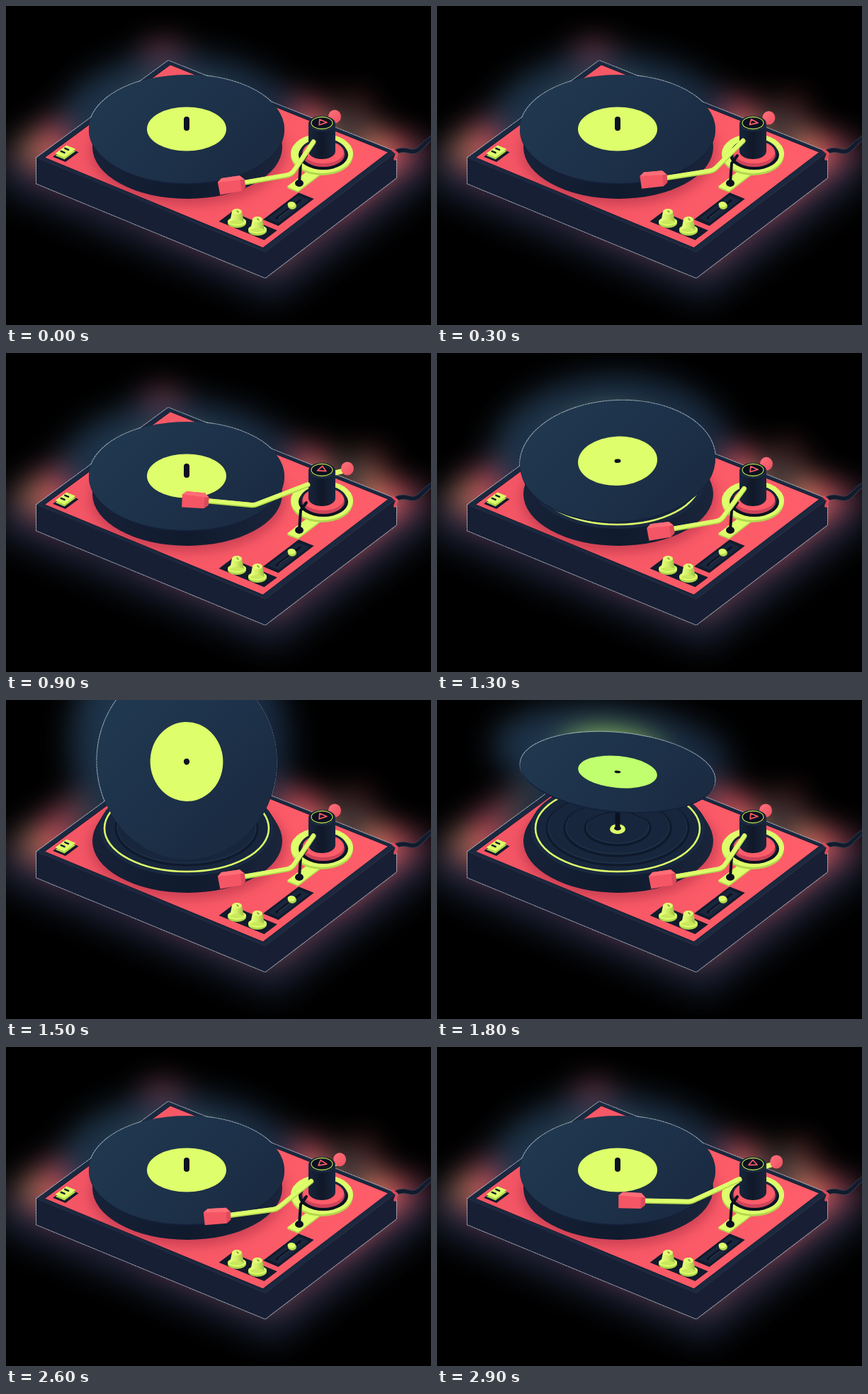
Animation, 600 px wide and 450 px high, one loop 3000 ms. Source, as an HTML page with a canvas:

```html
<!DOCTYPE html>
<html lang="en">
<head>
<meta charset="utf-8">
<title>Turntable</title>
<style>
html, body { margin: 0; width: 100%; height: 100%; overflow: hidden; background: #000; }
canvas { display: block; width: 600px; height: 450px; }
</style>
</head>
<body>
<canvas id="stage" width="600" height="450"></canvas>
<script>
const stage = document.getElementById('stage').getContext('2d');
const layer = document.createElement('canvas');
layer.width = 600;
layer.height = 450;
const g = layer.getContext('2d');

const DARK = '#121b2d', INK = '#0b1120', PINK = '#ff5c69', LIME = '#deff6b', OLIVE = '#b3d64e';
const LOOP = 3000, CYCLE = 2200, STEP = 100;
const TAU = Math.PI * 2;
const CX = 255;

const clamp = x => Math.min(1, Math.max(0, x));
const smooth = x => { x = clamp(x); return x * x * (3 - 2 * x); };
const smoother = x => { x = clamp(x); return x * x * x * (10 - 15 * x + 6 * x * x); };
const mix = (a, b, k) => a + (b - a) * k;

// Point on the lid: u runs along the front left edge, v along the back left edge
const lid = (u, v, down = 0) => [
  43 + 323 * u + 186 * v - u * v,
  214 + 133 * u - 137 * v - 4 * u * v + down
];

function poly(points, fill) {
  g.beginPath();
  points.forEach(([x, y]) => g.lineTo(x, y));
  g.closePath();
  if (fill) { g.fillStyle = fill; g.fill(); }
}

function slab(u0, v0, u1, v1, fill, down = 0) {
  poly([lid(u0, v0, down), lid(u0, v1, down), lid(u1, v1, down), lid(u1, v0, down)], fill);
}

function disc(x, y, rx, ry, fill, turn = 0) {
  g.beginPath();
  g.ellipse(x, y, rx, ry, turn, 0, TAU);
  if (fill) { g.fillStyle = fill; g.fill(); }
}

function outline(color, width) {
  g.strokeStyle = color;
  g.lineWidth = width;
  g.stroke();
}

function ring(x, y, rx, ry, color, width) {
  disc(x, y, rx, ry);
  outline(color, width);
}

function line(points, color, width) {
  g.beginPath();
  points.forEach(([x, y]) => g.lineTo(x, y));
  outline(color, width);
}

function shade(x0, y0, x1, y1, ...colors) {
  const gradient = g.createLinearGradient(x0, y0, x1, y1);
  colors.forEach((c, i) => gradient.addColorStop(i / (colors.length - 1), c));
  return gradient;
}

function speckle() {
  g.setLineDash([2, 2]);
  outline('rgba(195,210,220,.7)', 2);
  g.setLineDash([]);
}

// The record rises, turns over about a tilted axis and drops back
function recordAt(t) {
  const lift = 105 * (smooth((t - 1170) / 450) - smooth((t - 1675) / 335));
  const flip = Math.PI * smoother((t - 1180) / 780);
  const c = Math.cos(flip), s = Math.sin(flip);
  const normal = [-0.45 * s, 0.832 * c - 0.494 * s, 0.555 * c + 0.74 * s];
  const under = normal[2] < 0;
  const [nx, ny, nz] = under ? normal.map(n => -n) : normal;
  return { nx, ny, nz, lift, under, y: 173.5 - lift, turn: Math.atan2(nx, ny) };
}

function armAt(t) {
  const swing = smooth(t / 930) - smooth((t - 930) / 430);
  const move = (x0, y0, x1, y1) => [mix(x0, x1, swing), mix(y0, y1, swing)];
  const head = move(318.5, 252, 267, 207);
  head[1] += 18 * swing * (1 - swing);
  return {
    swing, head,
    angle: mix(-0.14, 0.09, swing),
    elbow: move(403, 237, 350, 214),
    joint: move(434, 191, 426, 185),
    ball: move(464, 156, 482, 163)
  };
}

function drawCable() {
  g.beginPath();
  g.moveTo(550, 206);
  g.bezierCurveTo(566, 198, 572, 211, 583, 202);
  g.bezierCurveTo(590, 196, 594, 190, 604, 184);
  outline('#3a4250', 7);
  outline(DARK, 5.5);
}

function drawBody() {
  const drop = 36.5;
  const left = lid(0, 0), front = lid(1, 0), right = lid(1, 1);
  const base = [lid(1, 1, drop), lid(1, 0, drop), lid(0, 0, drop)];
  poly([left, lid(0, 1), right, ...base]);
  speckle();
  poly([left, front, base[1], base[2]], '#171f34');
  poly([front, right, base[0], base[1]], '#181f34');
  slab(0, 0, 1, 1, '#1a2940');
  const pink = shade(60, 200, 540, 220, '#f25565', '#f95966', '#ff5d6a');
  slab(0.022, 0.022, 0.978, 0.978, pink);
  outline(DARK, 1);
  g.save();
  g.clip();
  g.filter = 'blur(8px)';
  disc(257, 205, 138, 76, 'rgba(120,20,50,.35)');
  g.restore();
  line([[546, 203], [552, 208], [549, 216]], '#d84a5b', 4);
}

function drawSwitch() {
  slab(0.04, 0.055, 0.095, 0.155, DARK, 1);
  slab(0.045, 0.065, 0.085, 0.15, OLIVE);
  slab(0.045, 0.065, 0.085, 0.15, LIME, -3);
  for (const v of [0.1, 0.13]) line([lid(0.05, v, -2), lid(0.065, v, -2)], DARK, 2.5);
}

function drawKnob(x, y) {
  disc(x, y + 1, 13, 7, OLIVE);
  disc(x, y - 1, 13, 6, LIME);
  poly([[x - 7, y - 15], [x + 7, y - 15], [x + 10, y], [x - 10, y]],
    shade(x - 9, 0, x + 9, 0, '#eaff83', '#d0ee60', '#9fbe46'));
  disc(x, y, 10, 3, '#c9e85c');
  disc(x, y - 15, 7, 4, '#e4ff72');
  line([[x, y - 16], [x + 2, y - 14]], '#6f8836', 1.5);
}

function drawControls() {
  slab(0.755, 0.074, 0.953, 0.173, DARK);
  drawKnob(326, 305);
  drawKnob(355, 316);
  slab(0.873, 0.205, 0.94, 0.476, DARK);
  slab(0.883, 0.225, 0.93, 0.456, '#1a263c');
  line([lid(0.906, 0.25), lid(0.906, 0.43)], INK, 3);
  line([lid(0.91, 0.26), lid(0.91, 0.34)], '#38475a', 1);
  disc(404, 282, 6, 5, OLIVE);
  disc(403, 280, 5.5, 4, LIME);
}

function drawPlatter() {
  // Tapered wall, stacked from the base up
  const wall = shade(122, 0, 390, 0, '#172238', '#101a2d', '#1a253b');
  for (let k = 0; k <= 1; k += 0.05) disc(256, mix(199, 182, k), mix(134, 124, k), mix(73, 68, k), wall);
  disc(CX, 181, 123, 67, '#192940');
  disc(CX, 181, 116, 61, '#17263c');
  outline(LIME, 2.6);
  for (const r of [100, 75, 46]) {
    ring(CX, 181, r, r * 0.52, '#0f192b', 3);
    ring(CX, 179, r - 2, r * 0.52 - 1, '#22354c', 1);
  }
  disc(CX, 182, 11, 7, LIME);
  disc(CX, 181, 5, 3, INK);
  line([[CX, 160], [CX, 180]], INK, 7);
}

function drawRecord(r) {
  const face = (radius, fill, depth = 0) =>
    disc(CX - r.nx * depth, r.y + r.ny * depth, radius, radius * r.nz, fill, r.turn);
  face(138, '#14203a', 2);
  face(138, shade(170, r.y - 80, 330, r.y + 80, '#20384f', '#1d324a', '#1a2b42'));
  face(56, r.under && r.lift > 0 ? '#c0ff6d' : LIME);
  if (r.lift < 14) line([[CX, 160], [CX, 172 - r.lift]], INK, 8);
  else face(4.5, INK);
}

function drawPivot({ ball: [bx, by], swing }) {
  const x = 447;
  slab(0.817, 0.485, 0.865, 0.68, OLIVE, 2);
  slab(0.817, 0.485, 0.865, 0.68, LIME);
  disc(x - 1, 211, 44, 28, OLIVE);
  disc(x - 1, 208, 44, 28, LIME);
  disc(x + 1, 210, 35, 21, INK);
  disc(x + 1, 207, 33, 20, '#18243a');
  disc(x + 1, 209, 30, 18, '#cf4459');
  disc(x + 1, 206, 29, 16, PINK);
  line([[414, 249], [416, 222], [424, 211]], INK, 4);
  disc(414, 250, 6, 5, INK);

  line([[452, 172], [bx, by + 2]], LIME, 7);
  disc(bx, by, 9, 9.5, shade(bx - 8, by - 8, bx + 8, by + 8, '#ff707a', '#ef5262'));

  g.fillStyle = shade(427, 0, 465, 0, '#18253b', '#101828', '#1a263d');
  g.fillRect(427, 166, 38, 39);
  disc(446, 205, 19, 11);
  g.fill();
  disc(446, 166, 19, 11, '#1c2b42');
  disc(446, 165, 17, 9.5, INK);
  ring(446, 165, 15, 8.5, OLIVE, 1.3);
  const corner = k => {
    const a = 0.05 + swing * 0.55 + k * TAU / 3;
    return [446 + 7 * Math.cos(a), 164 + 4.5 * Math.sin(a)];
  };
  poly([0, 1, 2].map(corner));
  outline(PINK, 1.7);
}

function drawArm({ head: [hx, hy], elbow: [ex, ey], joint: [jx, jy], angle }) {
  const tube = (dy, color, width) => {
    g.beginPath();
    g.moveTo(hx + 17 * Math.cos(angle), hy + 17 * Math.sin(angle) + dy - 1);
    g.arcTo(ex, ey + dy, jx, jy + dy, 16);
    g.lineTo(jx, jy + dy);
    outline(color, width);
  };
  tube(1, OLIVE, 7);
  tube(0, LIME, 5.5);
  g.save();
  g.translate(hx, hy);
  g.rotate(angle);
  poly([[-19, -6], [-13, -11], [13, -11], [19, -5], [19, 6], [13, 11], [-18, 12]], '#f45665');
  poly([[-19, -6], [-13, -11], [13, -11], [19, -5], [13, -5]], '#ff6d77');
  poly([[13, -5], [19, -5], [19, 6], [13, 11]], '#dc4a5b');
  g.restore();
}

function draw(time) {
  const t = time % CYCLE, record = recordAt(t), arm = armAt(t);
  g.clearRect(0, 0, 600, 450);
  g.lineCap = g.lineJoin = 'round';
  drawCable();
  disc(CX, record.y, 138, 138 * record.nz, null, record.turn);
  speckle();
  drawBody();
  drawSwitch();
  drawControls();
  drawPlatter();
  drawRecord(record);
  drawPivot(arm);
  drawArm(arm);

  stage.fillStyle = '#000';
  stage.fillRect(0, 0, 600, 450);
  // Halo: an enlarged, blurred copy of the scene
  stage.save();
  stage.globalAlpha = 0.75;
  stage.filter = 'blur(22px) brightness(1.3)';
  stage.translate(300, 225);
  stage.scale(1.2, 1.2);
  stage.drawImage(layer, -300, -225);
  stage.restore();
  stage.drawImage(layer, 0, 0);
}

function tick() {
  draw(Math.floor(performance.now() % LOOP / STEP) * STEP);
  requestAnimationFrame(tick);
}
tick();
</script>
</body>
</html>
```
